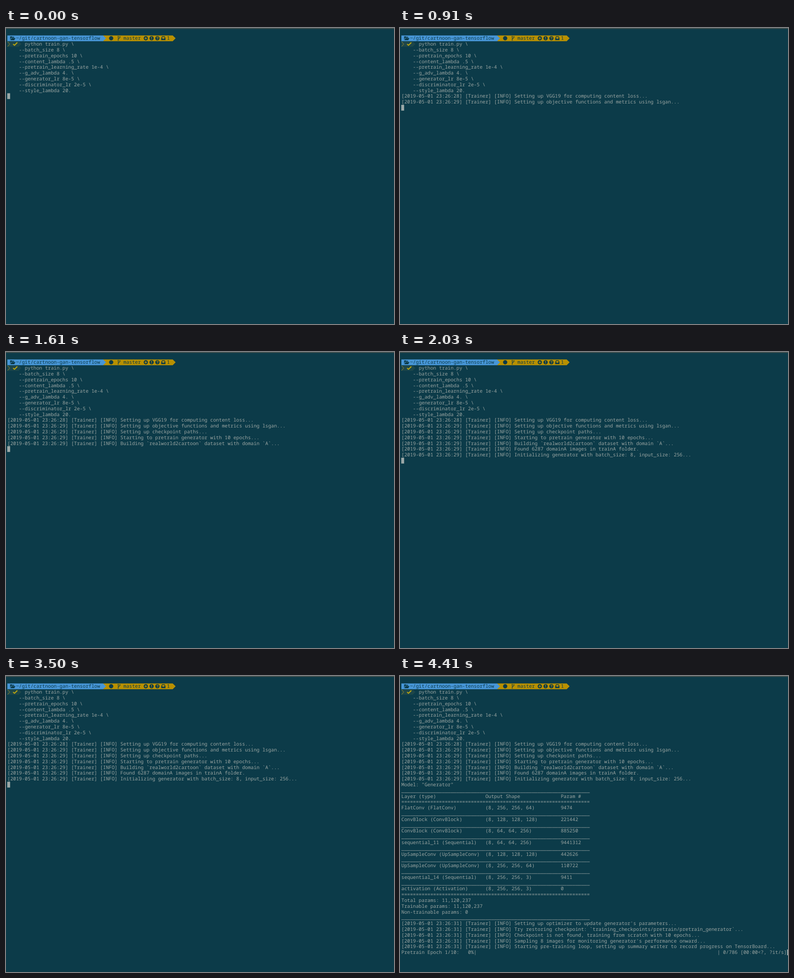
Write an HTML page that moves like this. It is 856 px wide and 655 px high and loops after 4550 ms.

```html
<!DOCTYPE html>
<html lang="en">
<head>
<meta charset="utf-8">
<title>Training log</title>
<style>
  html, body { margin: 0; width: 100%; height: 100%; overflow: hidden; background: #0c3b49; }
  svg { display: block; width: 856px; height: 655px; }
  text {
    font: 10.667px "Noto Sans Mono", "DejaVu Sans Mono", monospace;
    font-variant-ligatures: none;
    white-space: pre;
    text-rendering: geometricPrecision;
    fill: #9ba6a3;
  }
  .dark text { fill: #0c3b49; }
</style>
</head>
<body>
<svg id="stage" viewBox="0 0 856 655" xmlns="http://www.w3.org/2000/svg">
  <rect width="856" height="655" fill="#0c3b49"/>
  <rect width="856" height="2" fill="#41504f"/>

  <!-- prompt bar -->
  <path d="M214 16.4H367.8L374.2 22.8L367.8 29.2H214Z" fill="#b89000"/>
  <path d="M3 16.4H214.2L220.6 22.8L214.2 29.2H3Z" fill="#4796d7"/>
  <g id="bar" class="dark" fill="#0c3b49">
    <path d="M9.2 26.2V19.2Q9.2 18.4 10 18.4H12.6L13.6 19.5H17.2Q18 19.5 18 20.3V21.4H12.4Q11.6 21.4 11.1 22.2Z"/>
    <path d="M12.5 22.2H20.8L18.5 26.5Q18.2 27 17.6 27H9.6Z"/>
    <circle cx="232" cy="22.8" r="4.7"/>
    <g fill="none" stroke="#0c3b49">
      <path d="M247.6 19.8V26M251.3 20.3Q251.4 22.7 247.8 23.7" stroke-width="1.1"/>
      <g stroke-width=".8">
        <circle cx="247.6" cy="19" r="1"/>
        <circle cx="247.6" cy="26.6" r="1"/>
        <circle cx="251.3" cy="19.6" r="1"/>
      </g>
    </g>
    <circle cx="308.4" cy="22.8" r="4.7"/>
    <circle cx="321.2" cy="22.8" r="4.7"/>
    <circle cx="334" cy="22.8" r="4.7"/>
    <g fill="none" stroke="#b89000" stroke-width="1.4">
      <path d="M305.6 22.8H311.2M308.4 20V25.6"/>
      <path d="M321.2 19.6V23.6M321.2 24.7V26.1"/>
      <path d="M332.4 21.5Q332.5 20 334 20Q335.7 20 335.7 21.4Q335.7 22.3 334.7 22.8Q334 23.2 334 24M334 24.9V26.2" stroke-width="1.2"/>
    </g>
    <path fill-rule="evenodd" d="M344.2 18.6H350L351.8 22.6V26.8H342.4V22.6ZM345.1 19.9L343.8 22.8H345.6L346.3 24.1H347.9L348.6 22.8H350.4L349.1 19.9Z"/>
  </g>

  <!-- status segment -->
  <path d="M3 29.4H28L34 35.4L28 41.6H3Z" fill="#1d464a"/>
  <path d="M3.4 30.2L8.4 35.6L3.4 41" fill="none" stroke="#a08d2c"/>
  <path d="M15.6 35.5L18.7 38.3L25 32.2" fill="none" stroke="#b9a510" stroke-width="2.3"/>

  <g id="log"></g>
  <rect id="cursor" width="6.4" height="12.8" fill="#9ba8a7"/>
</svg>
<script>
const LOOP = 4550;
const COL = 6.4, ROW = 12.8, LEFT = 3, BASE = 26.4;
const FIRST = 10;   // first row of program output
const NS = "http://www.w3.org/2000/svg";
const byId = id => document.getElementById(id);
const log = byId("log"), cursor = byId("cursor");

function write(parent, row, col, str) {
  const el = document.createElementNS(NS, "text");
  el.setAttribute("x", LEFT + col * COL);
  el.setAttribute("y", BASE + row * ROW);
  el.textContent = str;
  parent.appendChild(el);
  return el;
}

write(byId("bar"), 0, 3, "~/git/cartnoon-gan-tensorflow");
write(byId("bar"), 0, 40, "master");
write(byId("bar"), 0, 55, "1");

const stage = byId("stage");
write(stage, 1, 6, "python train.py \\");
[
  "batch_size 8 \\",
  "pretrain_epochs 10 \\",
  "content_lambda .5 \\",
  "pretrain_learning_rate 1e-4 \\",
  "g_adv_lambda 4. \\",
  "generator_lr 8e-5 \\",
  "discriminator_lr 2e-5 \\",
  "style_lambda 20."
].forEach((arg, i) => write(stage, 2 + i, 4, "--" + arg));

const info = (sec, msg) => `[2019-05-01 23:26:${sec}] [Trainer] [INFO] ${msg}`;
const cells = (a, b, c) => a.padEnd(29) + b.padEnd(26) + c;
const rule = "_".repeat(65), bold = "=".repeat(65);

const layers = [
  ["FlatConv (FlatConv)", "(8, 256, 256, 64)", "9474"],
  ["ConvBlock (ConvBlock)", "(8, 128, 128, 128)", "221442"],
  ["ConvBlock (ConvBlock)", "(8, 64, 64, 256)", "885250"],
  ["sequential_11 (Sequential)", "(8, 64, 64, 256)", "9441312"],
  ["UpSampleConv (UpSampleConv)", "(8, 128, 128, 128)", "442626"],
  ["UpSampleConv (UpSampleConv)", "(8, 256, 256, 64)", "110722"],
  ["sequential_14 (Sequential)", "(8, 256, 256, 3)", "9411"],
  ["activation (Activation)", "(8, 256, 256, 3)", "0"]
].map(l => cells(...l));

const summary = [
  'Model: "Generator"',
  rule,
  cells("Layer (type)", "Output Shape", "Param #"),
  bold,
  ...layers.flatMap((l, i) => i ? [rule, l] : [l]),
  bold,
  "Total params: 11,120,237",
  "Trainable params: 11,120,237",
  "Non-trainable params: 0",
  rule
];

// Output arrives in bursts; endCol is where the cursor rests afterwards.
const bursts = [
  { at: 630, lines: [
    info(28, "Setting up VGG19 for computing content loss..."),
    info(29, "Setting up objective functions and metrics using lsgan...")
  ] },
  { at: 1190, lines: [
    info(29, "Setting up checkpoint paths..."),
    info(29, "Starting to pretrain generator with 10 epochs..."),
    info(29, "Building `realworld2cartoon` dataset with domain `A`...")
  ] },
  { at: 1750, lines: [
    info(29, "Found 6287 domainA images in trainA folder."),
    info(29, "Initializing generator with batch_size: 8, input_size: 256...")
  ] },
  { at: 3570, lines: summary },
  { at: 3640, endCol: 133, lines: [
    info(31, "Setting up optimizer to update generator's parameters..."),
    info(31, "Try restoring checkpoint: `training_checkpoints/pretrain/pretrain_generator`..."),
    info(31, "Checkpoint is not found, training from scratch with 10 epochs..."),
    info(31, "Sampling 8 images for monitoring generator's performance onward..."),
    info(31, "Starting pre-training loop, setting up summary writer to record progress on TensorBoard..."),
    "Pretrain Epoch 1/10:   0%|".padEnd(109) + "| 0/786 [00:00<?, ?it/s]"
  ] }
];

let next = FIRST;
for (const b of bursts) {
  b.group = document.createElementNS(NS, "g");
  log.appendChild(b.group);
  for (const line of b.lines) write(b.group, next++, 0, line);
  b.cursorRow = b.endCol ? next - 1 : next;
}

function draw(t) {
  let row = FIRST, col = 0;
  for (const b of bursts) {
    const shown = t >= b.at;
    b.group.style.display = shown ? "" : "none";
    if (shown) {
      row = b.cursorRow;
      col = b.endCol || 0;
    }
  }
  cursor.setAttribute("x", LEFT - 0.3 + col * COL);
  cursor.setAttribute("y", 16.4 + row * ROW);
}

const start = performance.now();
function tick() {
  draw((performance.now() - start) % LOOP);
  requestAnimationFrame(tick);
}
tick();
</script>
</body>
</html>
```
